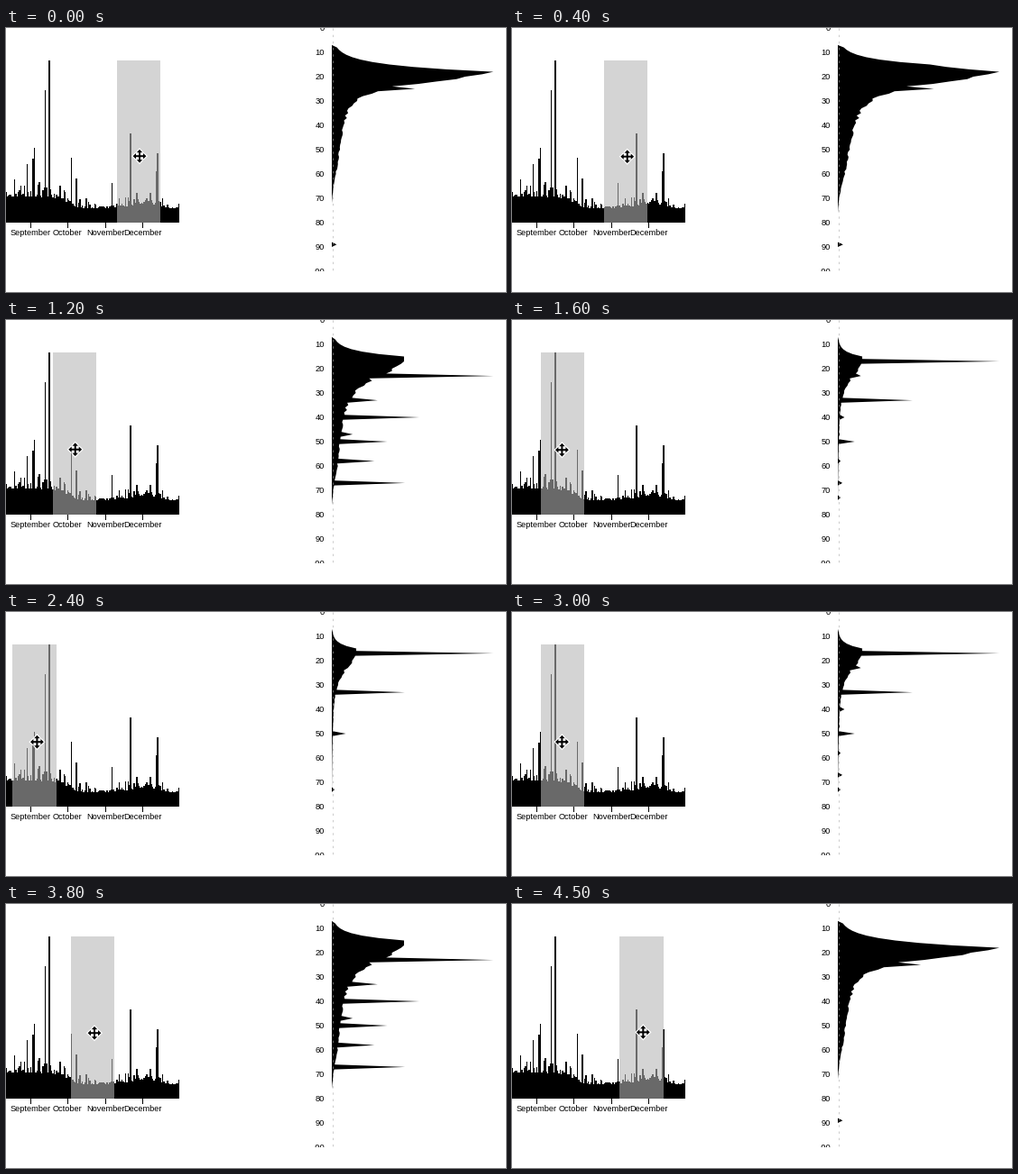
Recreate the animation shown at these times as a matplotlib script. Size 554 px wide and 293 px high, loop 4600 ms.

```python
import numpy as np
import matplotlib.pyplot as plt
from matplotlib.animation import FuncAnimation
from matplotlib.patches import Polygon, Rectangle

W, H, DPI = 554, 293, 100
FRAMES, INTERVAL = 46, 100
PX = 72 / DPI
DAY, DAYS, FIRST_X = 1.3667, 141, -0.66
BASE, TOP, BRUSH_W = 215.5, 36, 48.3
AXIS_X, SPAN, UNIT = 361, 179, 2.7

plt.rcParams["font.family"] = "Liberation Sans"
rng = np.random.default_rng(12)


def curve(x, *points):
    return np.interp(x, *np.transpose(points))


def daily_counts():
    """A falling trend with a small winter swell, noise, and some busy days."""
    x = FIRST_X + (np.arange(DAYS) + 0.5) * DAY
    trend = 15 + 13 / (1 + np.exp((x - 66) / 7))
    trend += 5 * np.exp(-((x - 154) / 18) ** 2)
    counts = trend + np.minimum(rng.exponential(0.22 * trend), 0.7 * trend)
    busy = [(23, 65), (29.6, 71), (31, 83), (43.7, 147), (47.8, 180), (72.4, 72),
            (77.5, 49), (117, 44), (138, 99), (166.5, 57), (167.8, 77)]
    for day_x, height in busy:
        counts[int((day_x - FIRST_X) / DAY)] = height
    return counts


v = np.arange(101)
ripple = 1 + np.where(v > 20, rng.uniform(-0.1, 0.1, v.size), 0)


def hump(start, end, rise, fall, tail, reach, last):
    """Exponential rise to a plateau, then a rounded fall with a long tail."""
    before, after = np.maximum(start - v, 0), np.maximum(v - end, 0)
    body = (1 - tail) * np.exp(-(after / fall) ** 1.5)
    body += tail * np.exp(-after / reach)
    fade = np.clip((last - v) / 15, 0, 1) * (v > 7)
    return np.exp(-before / rise) * body * fade * ripple


LATE = 100 * hump(18, 18, 2.9, 5.5, 0.2, 22, 72)
MIDDLE = 82 * hump(15, 17, 2.3, 8, 0.38, 27, 76)
EARLY = 360 * hump(15, 17, 1.9, 9, 0.15, 20, 60)
EARLY_X = 47.6

# Bursts per day: position on the timeline -> {value: height}.
BURSTS = {
    137.5: {25: 15, 89: 3},
    72.3: {23: 128, 40: 86, 47: 13},
    77.3: {33: 33, 50: 53, 58: 41, 67: 80},
    EARLY_X: {17: 2480, 50: 235, 73: 48},
    43.5: {33: 1250},
}


def distribution(left):
    mix = np.clip((left - 72) / 47, 0, 1)
    total = mix * LATE + (1 - mix) * MIDDLE
    if left < EARLY_X:
        total = total + EARLY
    for x, heights in BURSTS.items():
        if left - 0.5 <= x <= left + BRUSH_W:
            for value, height in heights.items():
                total[value] += height
    return total * SPAN / total.max()


def brush_left(t):
    return curve(t, (0, 123), (1, 119.3), (6, 90), (8, 72), (16, 31.8),
                 (18, 17.3), (22, 7.2), (23, 6.3))


def cursor_pos(t):
    grip = curve(t, (0, 25), (1, 26), (8, 26), (16, 23.6), (22, 27.2))
    return brush_left(t) + grip, min(142.2 + t / 8, 144.2)


def move_arrow():
    arm = np.array([(-1, -1), (-1, -4), (-3.2, -4), (0, -7.4),
                    (3.2, -4), (1, -4), (1, -1)])
    turn = np.array([[0, 1], [-1, 0]])
    parts = [arm]
    for _ in range(3):
        parts.append(parts[-1] @ turn)
    return np.vstack(parts)


fig = plt.figure(figsize=(W / DPI, H / DPI), dpi=DPI, facecolor="white")
ax = fig.add_axes([0, 0, 1, 1])
ax.set(xlim=(0, W), ylim=(H, 0))
ax.axis("off")


def label(x, y, text, ha):
    return ax.text(x, y, text, ha=ha, va="baseline", fontsize=9.3 * PX,
                   color="black")


ax.stairs(BASE - daily_counts(), FIRST_X + np.arange(DAYS + 1) * DAY,
          baseline=BASE, fill=True, color="black", lw=0, antialiased=False)
for name, day in [("September", 20), ("October", 50), ("November", 81),
                  ("December", 111)]:
    x = FIRST_X + day * DAY
    ax.plot([x, x], [BASE, 221], color="black", lw=PX)
    label(x + 0.4, 230, name, "center")

window = Rectangle((341.5, 0), W - 341.5, 270, transform=ax.transData)
for value in range(0, 101, 10):
    tick = label(353, value * UNIT + 3.2, str(value), "right")
    tick.set_clip_path(window)
    tick.set_clip_on(True)
ax.plot([361.5, 361.5], [0, 270], color="#aaaaaa", lw=0.6 * PX, dashes=(4, 8))

area = ax.add_patch(Polygon([(0, 0), (1, 1), (1, 0)], fc="black", lw=0))
brush = ax.add_patch(Rectangle((0, TOP), BRUSH_W, BASE - TOP, fc="#b6b6b6",
                               alpha=0.58, lw=0))
arrow = move_arrow()
halo = ax.add_patch(Polygon(arrow, fc="white", ec="white", lw=2.4 * PX))
cursor = ax.add_patch(Polygon(arrow, fc="black", lw=0))


def update(frame):
    t = min(frame, FRAMES - frame)
    left = brush_left(t)
    edge = np.column_stack([AXIS_X + distribution(left), v * UNIT])
    area.set_xy(np.vstack([(AXIS_X, 0), edge, (AXIS_X, 270)]))
    brush.set_x(left)
    spot = arrow + cursor_pos(t)
    halo.set_xy(spot)
    cursor.set_xy(spot)
    return area, brush, halo, cursor


anim = FuncAnimation(fig, update, frames=FRAMES, interval=INTERVAL, repeat=True,
                     repeat_delay=0, blit=False)
plt.show()
```
